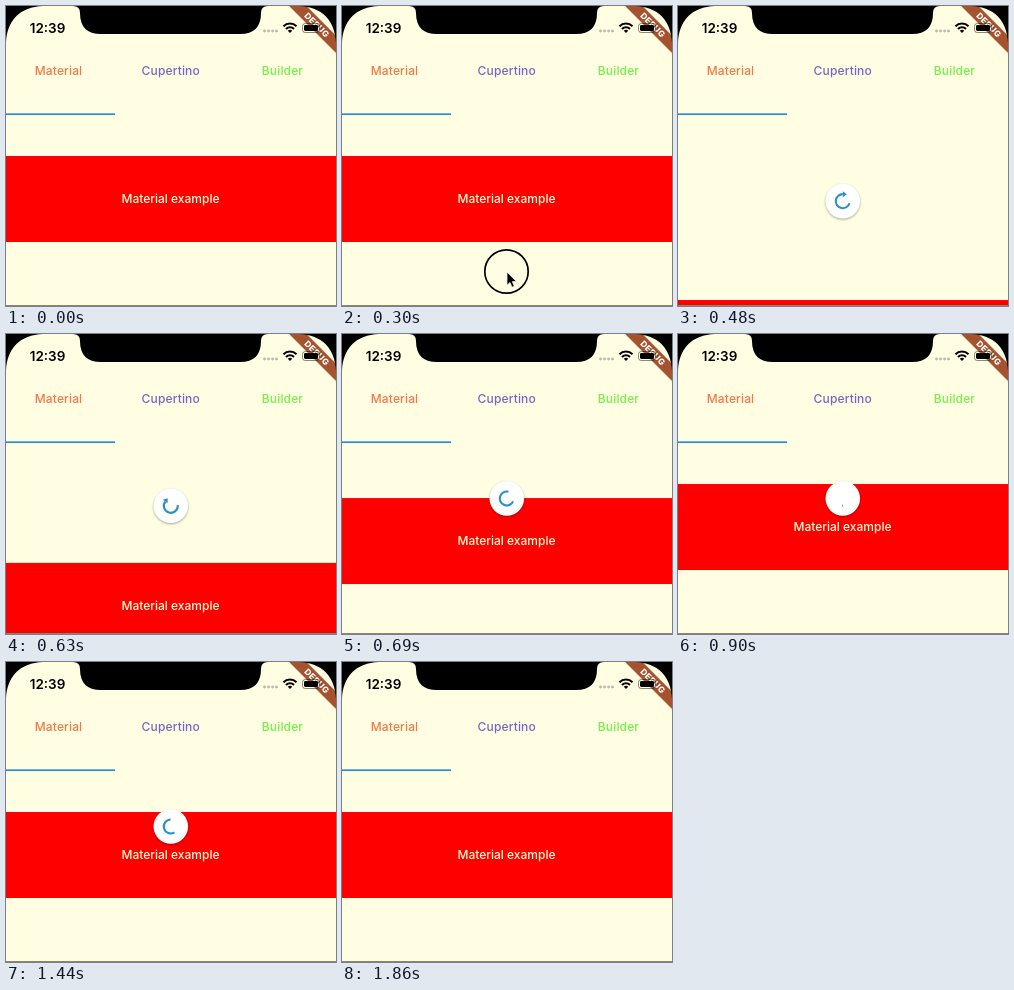
Animation, 330 px wide and 300 px high, one loop 1920 ms. Source, as an HTML page:

```html
<!DOCTYPE html>
<html lang="en">
<head>
<meta charset="utf-8">
<title>Pull to refresh</title>
<style>
  html, body { margin: 0; width: 100%; height: 100%; overflow: hidden; background: #fffee3; }
  svg { display: block; width: 330px; height: 300px; }
  text { font: 500 12px Inter, "Liberation Sans", sans-serif; text-anchor: middle; }
  .tab { letter-spacing: .15px; }
  .clock { font-size: 13.5px; font-weight: 600; }
  .flag { font-size: 8.5px; font-weight: 800; letter-spacing: .3px; fill: #fff; }
  #disc { filter: drop-shadow(0 1px 1.3px rgba(0, 0, 0, .35)); }
</style>
</head>
<body>
<svg viewBox="0 0 330 300">
  <defs>
    <clipPath id="body"><rect y="109" width="330" height="191"/></clipPath>
  </defs>
  <rect width="330" height="300" fill="#fffee3"/>

  <g id="item">
    <rect y="150" width="330" height="86" fill="#f00"/>
    <text x="164.5" y="197" fill="#ffffd2">Material example</text>
  </g>

  <g clip-path="url(#body)">
    <g id="spinner">
      <circle id="disc" r="17.3" fill="#fff"/>
      <g id="mark">
        <path id="arc" fill="none" stroke="#2a8fc4" stroke-width="2.1"/>
        <path id="head" fill="#2a8fc4"/>
      </g>
    </g>
  </g>

  <text class="tab" x="52.5" y="69" fill="#f0784a">Material</text>
  <text class="tab" x="164.7" y="69" fill="#7466c8">Cupertino</text>
  <text class="tab" x="276.5" y="69" fill="#74f04a">Builder</text>
  <rect y="107.3" width="109" height="1.8" fill="#3492c6"/>

  <g transform="translate(330 0) rotate(45)">
    <rect x="-50" y="20.5" width="100" height="13" fill="#000" opacity=".18"/>
    <rect x="-50" y="21" width="100" height="12" fill="#a5532f"/>
    <text class="flag" x="0" y="30">DEBUG</text>
  </g>

  <!-- status bar -->
  <text class="clock" x="41.5" y="27">12:39</text>
  <g fill="#b9b9a6">
    <circle cx="258.5" cy="25" r="1.4"/><circle cx="262.5" cy="25" r="1.4"/>
    <circle cx="266.5" cy="25" r="1.4"/><circle cx="270.5" cy="25" r="1.4"/>
  </g>
  <g fill="none" stroke="#000" stroke-width="2.1">
    <path d="M277.5 20.2a9.2 9.2 0 0 1 13 0M280 22.9a5.7 5.7 0 0 1 8 0"/>
    <path d="M284 27l-2.2-2.2a3.2 3.2 0 0 1 4.4 0z" fill="#000" stroke="none"/>
  </g>
  <rect x="296.5" y="17.5" width="17" height="9" rx="2.6" fill="none" stroke="#000" opacity=".45"/>
  <rect x="298" y="19" width="14" height="6" rx="1.4"/>
  <path d="M315 20.3q1.6 1.7 0 3.4z" opacity=".5"/>

  <!-- screen edge and notch -->
  <path d="M0 0H37C14 1 1 14 0 37zM330 0H293C316 1 329 14 330 37z"/>
  <path d="M67 0Q74 0 74 7Q74 28 95 28H234Q255 28 255 7Q255 0 262 0z"/>
  <rect y="299" width="330" height="1" fill="#8b8768"/>

  <g id="pointer">
    <circle cx="-.5" cy="-.5" r="21.7" fill="none" stroke="#000" stroke-width="1.7"/>
    <path d="M0 0V13.2L3 10.5L5 15.2L7.3 14.2L5.3 9.6H9.4z" stroke="#fff" stroke-width=".7"/>
  </g>
</svg>
<script>
const LOOP = 1920, STEP = 30;
const SPEED = 10 / 3;            // app time runs faster than the clock
const CYCLE = 1333, TURN = 2222; // spinner periods in app time
const PRESS = 300, FULL = 498, RELEASE = 595, SNAPPED = 640, DONE = 1540, GONE = 1600;
const PULL = 147, REST_Y = 164.5, TRAVEL = 77, R = 7;

const $ = id => document.getElementById(id);
const clamp = x => Math.min(1, Math.max(0, x));
const part = (t, a, b) => clamp((t - a) / (b - a));
const wave = u => (1 - Math.cos(Math.PI * u)) / 2;
const rad = deg => deg * Math.PI / 180;

// cubic-bezier(.4, 0, .2, 1)
function ease(x) {
  let lo = 0, hi = 1, s = .5;
  for (let i = 0; i < 20; i++) {
    s = (lo + hi) / 2;
    const bx = 3 * (1 - s) ** 2 * s * .4 + 3 * (1 - s) * s * s * .2 + s ** 3;
    if (bx < x) lo = s; else hi = s;
  }
  return s * s * (3 - 2 * s);
}

// overdamped bounce back to rest
function bounce(sec) {
  const a = 9.07, b = 22;
  return (b * Math.exp(-a * sec) - a * Math.exp(-b * sec)) / (b - a);
}

function pullAt(t) {
  if (t < RELEASE) return PULL * wave(part(t, PRESS, FULL));
  return PULL * bounce((t - RELEASE) * SPEED / 1000);
}

function drawArc(tau, headScale) {
  const u = tau / CYCLE % 1;
  const tail = 270 * ease(clamp(u * 2 - 1));
  const front = 270 * ease(clamp(u * 2));
  const base = -90 + tau / TURN * 360 + u * 90;
  const sweep = Math.max(front - tail, 1);
  const a = rad(base + tail), b = rad(base + tail + sweep);
  const at = (ang, r) => [Math.cos(ang) * r, Math.sin(ang) * r];
  $('arc').setAttribute('d', `M${at(a, R)}A${R} ${R} 0 ${+(sweep > 180)} 1 ${at(b, R)}`);

  const [x, y] = at(b, R), w = 3 * headScale, l = 4 * headScale;
  const tip = [x - Math.sin(b) * l, y + Math.cos(b) * l];
  $('head').setAttribute('d', headScale ? `M${at(b, R - w)}L${at(b, R + w)}L${tip}z` : '');
}

function draw(t) {
  const pull = pullAt(t);
  $('item').setAttribute('transform', `translate(0 ${pull.toFixed(2)})`);

  const top = PULL / 103;
  const pos = t < RELEASE ? pull / 103 : top + (1 - top) * part(t, RELEASE, SNAPPED);
  const size = 1 - part(t, DONE, GONE);
  const shown = pos > 0 && size > 0;
  $('spinner').style.display = shown ? '' : 'none';
  if (shown) {
    const y = REST_Y + (pos - 1) * TRAVEL;
    $('spinner').setAttribute('transform', `translate(164.8 ${y}) scale(${size})`);
    $('mark').setAttribute('opacity', clamp(pos));
    const spinning = t >= SNAPPED;
    const value = pos / 2;
    const tau = spinning ? CYCLE / 4 + (t - SNAPPED) * SPEED : value * CYCLE / 2;
    drawArc(tau, spinning ? 0 : clamp(value * 2));
  }

  const enter = wave(part(t, 60, 240));
  const py = t < RELEASE ? 330 - 64 * enter + pull * 1.9 : 400;
  $('pointer').setAttribute('transform', `translate(165 ${py})`);
}

const start = performance.now();
function tick() {
  const t = (performance.now() - start) % LOOP;
  draw(Math.floor(t / STEP) * STEP);
  requestAnimationFrame(tick);
}
tick();
</script>
</body>
</html>
```
